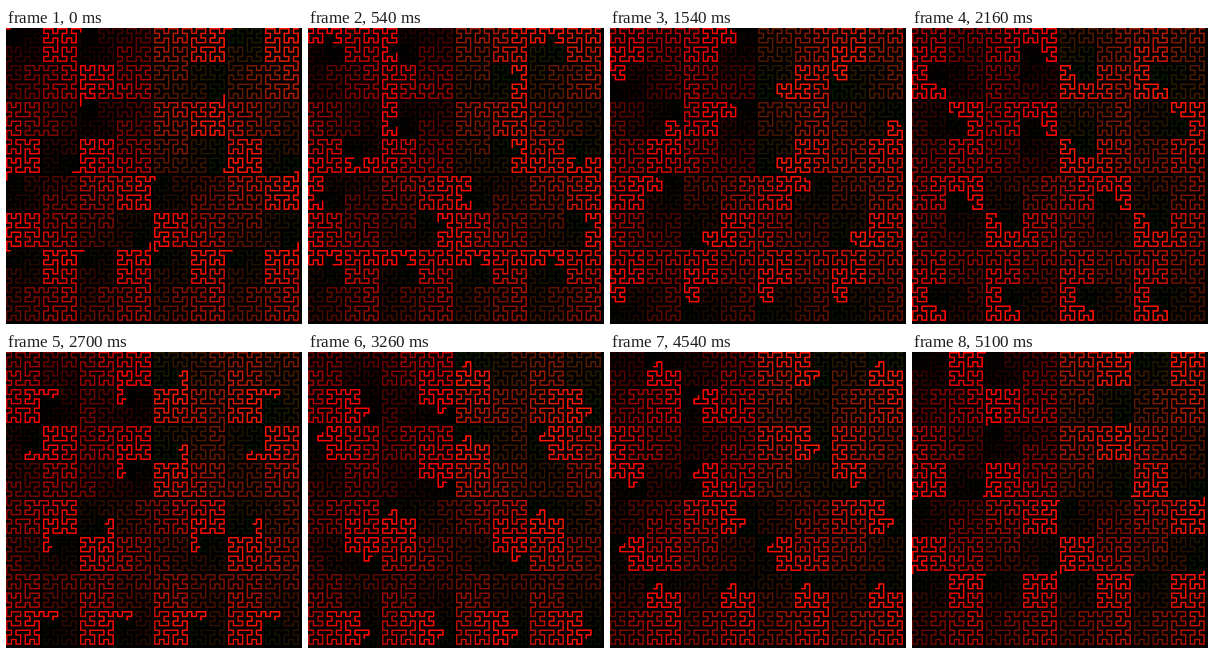
Write an HTML page with a canvas that moves like this. It is 384 px wide and 384 px high and loops after 5120 ms.

```html
<!DOCTYPE html>
<html lang="en">
<head>
<meta charset="utf-8">
<title>Hilbert curve pulses</title>
<style>
  html, body { margin: 0; width: 100%; height: 100%; overflow: hidden; background: #000; }
  canvas { display: block; width: 384px; height: 384px; }
</style>
</head>
<body>
<canvas id="stage" width="384" height="384"></canvas>
<script>
const SIDE = 64, CELL = 6, LINE = 2;
const PERIOD = 256, STEP_MS = 20, MAX_GREEN = 24;
const ctx = document.getElementById('stage').getContext('2d');

// Grid position of the n-th point on the Hilbert curve.
function hilbert(n) {
  let x = 0, y = 0;
  for (let s = 1; s < SIDE; s *= 2) {
    const rx = (n >> 1) & 1;
    const ry = (n ^ rx) & 1;
    if (!ry) {
      if (rx) { x = s - 1 - x; y = s - 1 - y; }
      [x, y] = [y, x];
    }
    x += s * rx;
    y += s * ry;
    n >>= 2;
  }
  return [x, y];
}

const points = Array.from({ length: SIDE * SIDE }, (_, i) => hilbert(i));
const segments = points.slice(1).map(([x2, y2], i) => {
  const [x1, y1] = points[i];
  return {
    x: Math.min(x1, x2) * CELL,
    y: Math.min(y1, y2) * CELL,
    w: Math.abs(x2 - x1) * CELL + LINE,
    h: Math.abs(y2 - y1) * CELL + LINE,
    green: Math.round(MAX_GREEN * i / points.length)
  };
});

// Every run of 256 segments carries one head with a fading tail behind it.
function draw(step) {
  ctx.fillStyle = '#000';
  ctx.fillRect(0, 0, 384, 384);
  segments.forEach((s, i) => {
    const age = (step - i + points.length) % PERIOD;
    ctx.fillStyle = `rgb(${PERIOD - 1 - age},${s.green},0)`;
    ctx.fillRect(s.x, s.y, s.w, s.h);
  });
}

const start = performance.now();
let shown = 0;
function tick() {
  const elapsed = Math.max(0, performance.now() - start);
  const step = Math.floor(elapsed / STEP_MS) % PERIOD;
  if (step !== shown) draw(shown = step);
  requestAnimationFrame(tick);
}
draw(0);
requestAnimationFrame(tick);
</script>
</body>
</html>
```
